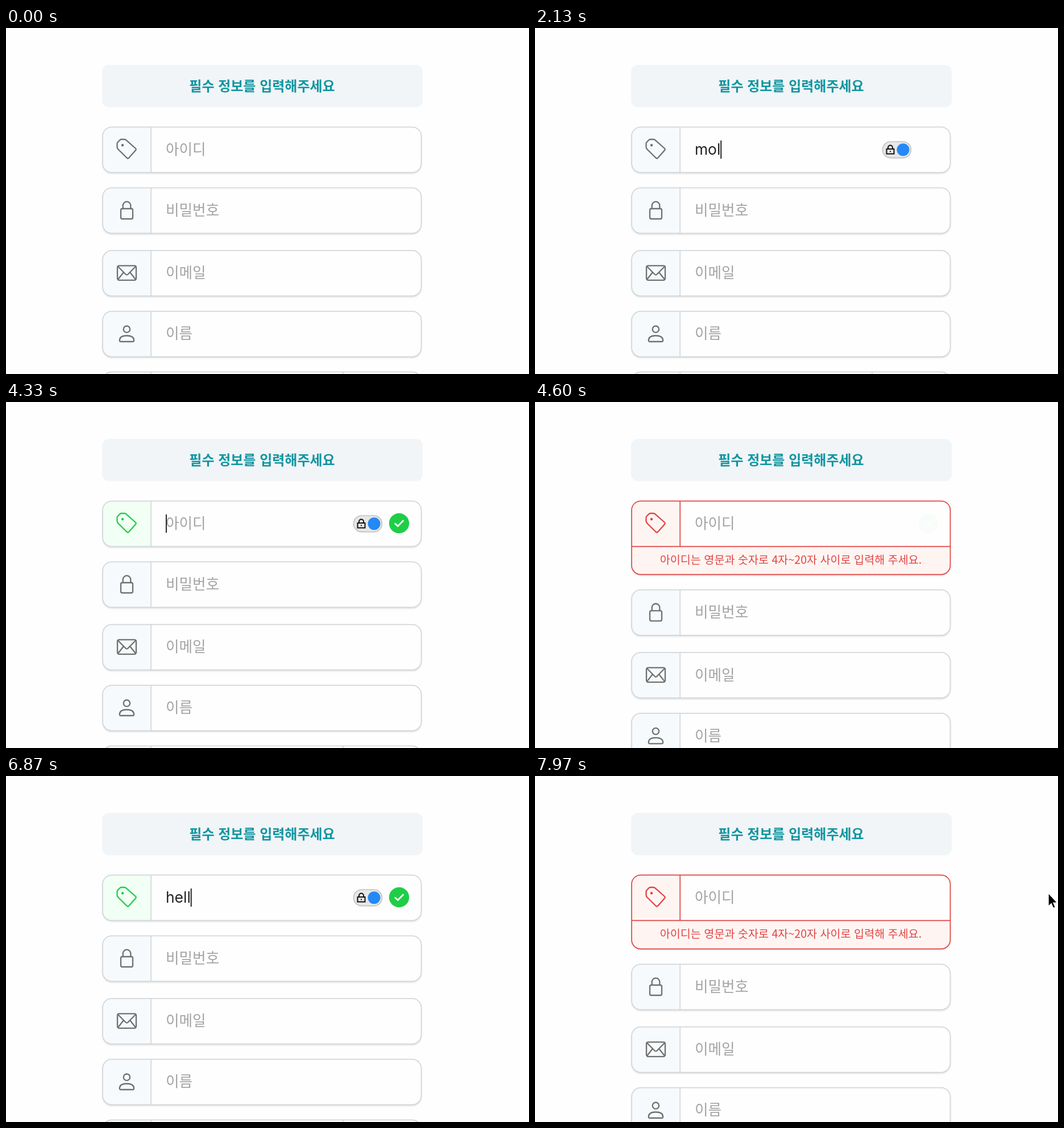
Write an HTML page that moves like this. It is 920 px wide and 609 px high and loops after 8 s.

```html
<!DOCTYPE html>
<html lang="ko">
<head>
<meta charset="utf-8">
<title>필수 정보 입력</title>
<style>
html, body { margin: 0; width: 100%; height: 100%; overflow: hidden; background: #fefefe; }
svg { display: block; width: 920px; height: 609px; }
text { font-family: "Noto Sans CJK KR", "Noto Sans CJK", sans-serif; }
.title { font-size: 24px; font-weight: 700; fill: #1095a1; }
.hint { font-size: 25.6px; fill: #a3a3a3; }
.msg { font-size: 19.6px; fill: #e04543; }
.typed { font: 26.4px Inter, sans-serif; fill: #222; }
.icon { fill: none; stroke: #707070; stroke-width: 2.3; stroke-linecap: round; stroke-linejoin: round; }
.box { fill: #fefefe; filter: drop-shadow(0 2px 1.5px rgba(0,0,0,.15)); }
.edge { fill: none; stroke: #d3d7da; stroke-width: 1.7; }
.side { fill: #f6fafc; }
</style>
</head>
<body>
<svg viewBox="0 0 920 609">
  <rect x="169" y="65" width="564" height="74.5" rx="12" fill="#f1f5f7"/>
  <text class="title" x="450.5" y="110.5" text-anchor="middle">필수 정보를 입력해주세요</text>

  <clipPath id="clip"><rect id="clipBox" x="170" y="174.3" width="560.5" height="80" rx="16"/></clipPath>
  <rect id="idBox" class="box" x="170" y="174.3" width="560.5" height="80" rx="16"/>
  <g clip-path="url(#clip)">
    <rect id="idSide" x="170" y="174" width="85" height="80.5"/>
    <path id="idLine" class="edge" d="M255.2 174V254.3"/>
    <g id="error">
      <rect x="170" y="254.3" width="561" height="52" fill="#fef5f3"/>
      <text class="msg" x="450" y="285" text-anchor="middle">아이디는 영문과 숫자로 4자~20자 사이로 입력해 주세요.</text>
      <path class="edge" style="stroke:#e04543" d="M170 254.3H731"/>
    </g>
  </g>
  <rect id="idEdge" class="edge" x="170" y="174.3" width="560.5" height="80" rx="16"/>
  <g id="tag" class="icon">
    <path d="M195.5 203.5Q195.5 202 196.5 201L200.5 197Q201.5 196 203 196H208Q210 196 211.5 197.4L228 212Q229.6 213.5 228 215.2L216 228.7Q214.4 230.3 212.7 228.7L197 213.2Q195.5 211.8 195.5 209.5Z"/>
    <circle cx="205" cy="206.2" r="1.1"/>
  </g>
  <text id="idHint" class="hint" x="281" y="222.7">아이디</text>
  <text id="typed" class="typed" x="281" y="223.2"></text>
  <rect id="caret" y="198" width="1.8" height="32" fill="#111"/>

  <g id="pill">
    <rect x="611.4" y="200" width="50" height="28.6" rx="14.3" fill="#e7e7e7" stroke="#c2c2c2" stroke-width="1.6"/>
    <path d="M618.5 213H631.5V221.5H618.5ZM621 213V210.5a4 4 0 0 1 8 0V213M625 216.3V218.3" fill="none" stroke="#111" stroke-width="2"/>
    <circle cx="647.5" cy="214.2" r="11" fill="#2389f7"/>
  </g>
  <g id="check">
    <circle cx="691.5" cy="213.5" r="17.7" fill="#1fce46"/>
    <path d="M684.7 214.2L689.3 218.5L698.6 209" fill="none" stroke="#fff" stroke-width="2.8" stroke-linecap="round" stroke-linejoin="round"/>
  </g>

  <g id="rows"></g>
  <path id="mouse" d="M0 0V23.5L5.2 18.6L8.6 26.6L12.4 25L9 17.2H16Z" fill="#000" stroke="#fff" stroke-width="1.4"/>
</svg>
<script>
const LOOP = 8000;
const $ = id => document.getElementById(id);

const ICONS = {
  lock: '<rect x="202" y="318" width="21" height="18" rx="2.5"/><path d="M205.7 318V312.5a6.8 6.8 0 0 1 13.6 0V318"/>',
  mail: '<rect x="196" y="418.3" width="33" height="25.5" rx="3"/><path d="M197.2 420L210.5 433.5Q212.5 435.3 214.5 433.5L227.8 420M197.2 442.3L206.5 430.5M227.8 442.3L218.5 430.5"/>',
  user: '<circle cx="212.4" cy="530.2" r="5.7"/><path d="M202 552Q199.5 552 199.8 549C200.4 543.6 205.5 541.5 212.4 541.5S224.4 543.6 225.1 549Q225.3 552 222.9 552Z"/>'
};

const row = (y, hint, icon, extra = '') => `
  <rect class="box" x="170" y="${y}" width="560.5" height="80" rx="16"/>
  <path class="side" d="M255 ${y}H186a16 16 0 0 0-16 16v48a16 16 0 0 0 16 16h69Z"/>
  <path class="edge" d="M255.2 ${y}v80${extra}"/>
  <rect class="edge" x="170" y="${y}" width="560.5" height="80" rx="16"/>
  <g class="icon">${icon}</g>
  <text class="hint" x="281" y="${y + 48.7}">${hint}</text>`;

$('rows').innerHTML =
  row(281.3, '비밀번호', ICONS.lock) +
  row(391.6, '이메일', ICONS.mail) +
  row(498.6, '이름', ICONS.user) +
  row(605.4, '', '', 'M593 605.4v80');

// Each session: word, key times, delete times
const SESSIONS = [
  { word: 'moluven', keys: [1500, 1700, 1900, 2150, 2350, 2540, 2730], dels: [3700, 3800, 3900, 4000, 4100, 4200, 4300] },
  { word: 'hell', keys: [5400, 5590, 5830, 6170], dels: [6990, 7090, 7190, 7290] }
];
const FOCUS = [[1070, 4470], [4970, 7400]];
const CARET = [[1270, 3265], [3630, 4470], [5000, 6650], [6865, 7400]];
const ERROR = [[4470, 1], [6190, 0], [7400, 1]];
const GOOD = [[2150, 1], [4470, 0], [6190, 1], [7400, 0]];
const MOUSE = [[870, 918, 216], [1070, 700, 212], [7560, 738, 240], [7970, 903, 206]];

const clamp = v => Math.max(0, Math.min(1, v));
const easeOut = p => 1 - (1 - p) ** 4;
const within = (spans, t) => spans.some(([a, b]) => t >= a && t < b);
const past = (times, t) => times.filter(x => x <= t).length;

function level(steps, t, span) {
  let v = 0;
  for (const [at, to] of steps) if (t >= at) v += (to - v) * easeOut(clamp((t - at) / span));
  return v;
}

const mix = (a, b, p) => a.map((v, i) => v + (b[i] - v) * p);
const tint = (base, good, bad, g, e) =>
  `rgb(${mix(mix(base, good, g), bad, e).map(Math.round)})`;

function typedAt(t) {
  for (const s of SESSIONS) {
    const n = past(s.keys, t) - past(s.dels, t);
    if (n > 0) return s.word.slice(0, n);
  }
  return '';
}

function moveMouse(t) {
  let on = false;
  for (const i of [0, 2]) {
    const [a, x, y] = MOUSE[i], [b, x2, y2] = MOUSE[i + 1];
    if (t < a || t >= b + 30) continue;
    if (i === 0 && t >= b) continue;
    const p = clamp((t - a) / (b - a));
    $('mouse').setAttribute('transform', `translate(${x + (x2 - x) * p} ${y + (y2 - y) * p})`);
    on = true;
  }
  $('mouse').style.opacity = on ? 1 : 0;
}

function draw(t) {
  const text = typedAt(t);
  const err = level(ERROR, t, 200);
  const good = level(GOOD, t, 200);
  const grow = 50 * err;

  for (const id of ['clipBox', 'idBox', 'idEdge']) $(id).setAttribute('height', 80 + grow);
  $('rows').setAttribute('transform', `translate(0 ${grow})`);
  $('error').style.opacity = clamp(err * 4);

  const edge = tint([211, 215, 218], [211, 215, 218], [224, 69, 67], good, err);
  $('idEdge').style.stroke = $('idLine').style.stroke = edge;
  $('idSide').style.fill = tint([246, 250, 252], [241, 255, 245], [254, 245, 243], good, err);
  $('tag').style.stroke = tint([112, 112, 112], [31, 206, 70], [224, 69, 67], good, err);
  $('check').style.opacity = good;

  $('typed').textContent = text;
  $('idHint').style.opacity = text ? 0 : 1;
  $('pill').style.opacity = within(FOCUS, t) ? 1 : 0;
  $('caret').style.opacity = within(CARET, t) ? 1 : 0;
  $('caret').setAttribute('x', 281 + (text ? $('typed').getComputedTextLength() : 0));
  moveMouse(t);
}

const start = performance.now();
function tick() {
  draw((performance.now() - start) % LOOP);
  requestAnimationFrame(tick);
}
tick();
</script>
</body>
</html>
```
